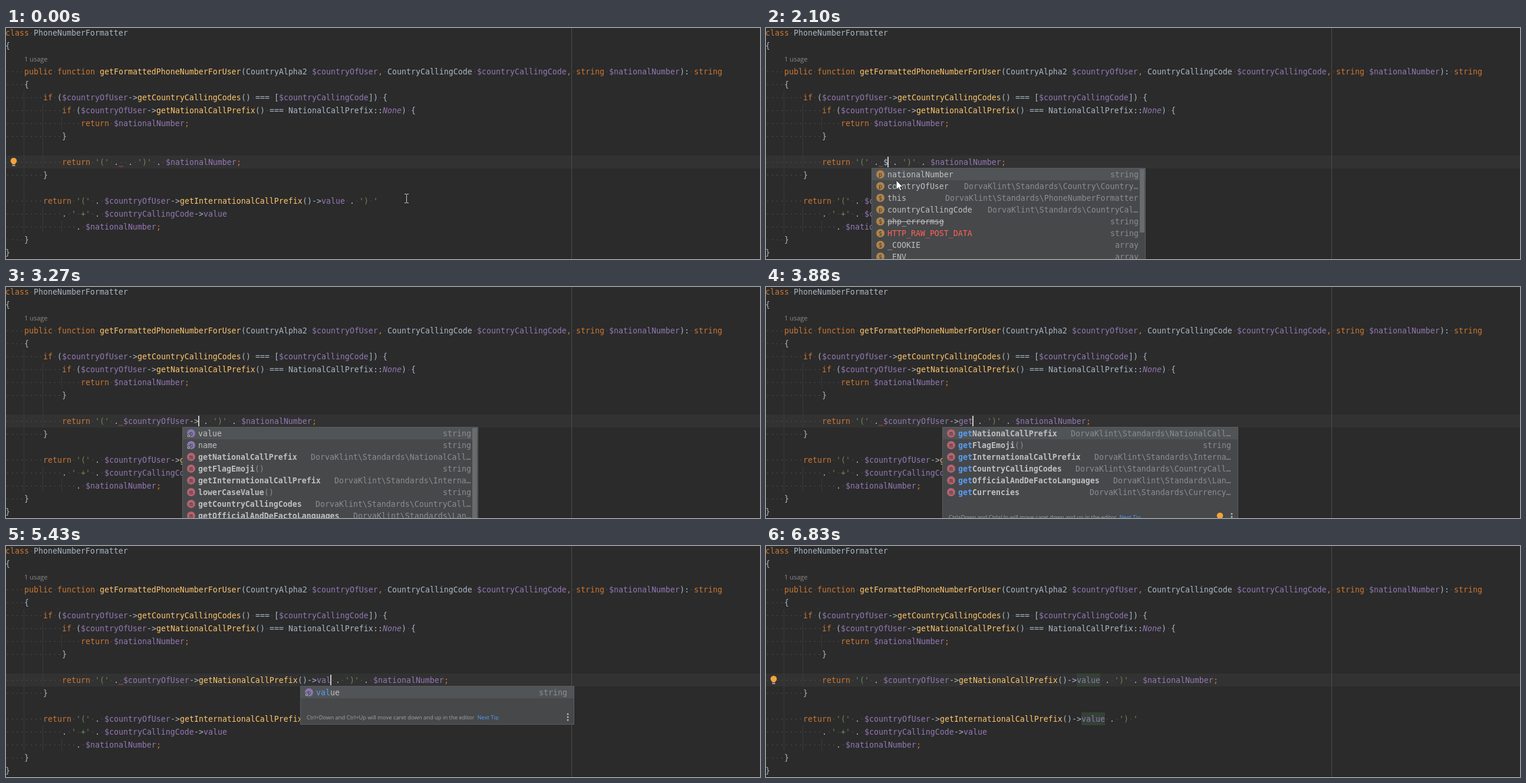
Animation, 1279 px wide and 393 px high, one loop 7150 ms. Source, as an HTML page with a canvas:

```html
<!DOCTYPE html>
<html lang="en">
<head>
<meta charset="utf-8">
<title>Code completion</title>
<style>
html, body { margin: 0; width: 100%; height: 100%; overflow: hidden; background: #2b2b2b; }
canvas { display: block; }
</style>
</head>
<body>
<canvas id="stage" width="1279" height="393"></canvas>
<script>
const ctx = document.getElementById('stage').getContext('2d');
const LOOP = 7150, CELL = 8, EDIT_ROW = 10, EDIT_COL = 25;
const MONO = '13.288px "DejaVu Sans Mono", monospace';
const SANS = '"Open Sans", "Noto Sans", sans-serif';
const TEXT = '#a9b7c6', KEYWORD = '#cc7832', METHOD = '#ffc66d', STRING = '#6a8759';
const VARIABLE = '#9378b4', BLUE = '#589df6', DIM = '#8b8e91', USAGE = '#344134';

const NS = 'DorvaKlint\\Standards\\';
const lines = [
  'class PhoneNumberFormatter',
  '{',
  '',
  '    public function getFormattedPhoneNumberForUser(CountryAlpha2 $countryOfUser, CountryCallingCode $countryCallingCode, string $nationalNumber): string',
  '    {',
  '        if ($countryOfUser->getCountryCallingCodes() === [$countryCallingCode]) {',
  '            if ($countryOfUser->getNationalCallPrefix() === NationalCallPrefix::None) {',
  '                return $nationalNumber;',
  '            }',
  '',
  '',
  '        }',
  '',
  "        return '(' . $countryOfUser->getInternationalCallPrefix()->value . ') '",
  "            . ' +' . $countryCallingCode->value",
  '               . $nationalNumber;',
  '    }',
  '}'
];

// Completion entries: icon, name, type, optional style
const variables = [
  ['p', 'nationalNumber', 'string'],
  ['p', 'countryOfUser', NS + 'Country\\Country…'],
  ['$', 'this', NS + 'PhoneNumberFormatter'],
  ['p', 'countryCallingCode', NS + 'CountryCal…'],
  ['$', 'php_errormsg', 'string', 'strike'],
  ['$', 'HTTP_RAW_POST_DATA', 'string', 'red'],
  ['$', '_COOKIE', 'array'],
  ['$', '_ENV', 'array']
];
const countries = [
  ['p', 'countryOfUser', NS + 'Country\\CountryAlpha2'],
  ['p', 'countryCallingCode', NS + 'CountryCallingC…']
];
const properties = [['f', 'value', 'string'], ['f', 'name', 'string']];
const methods = [
  ['m', 'getNationalCallPrefix', NS + 'NationalCall…'],
  ['m', 'getFlagEmoji()', 'string'],
  ['m', 'getInternationalCallPrefix', NS + 'Interna…'],
  ['m', 'lowerCaseValue()', 'string'],
  ['m', 'getCountryCallingCodes', NS + 'CountryCall…'],
  ['m', 'getOfficialAndDeFactoLanguages', NS + 'Lan…']
];
const getters = [...methods.filter(m => m[1].startsWith('get')), ['m', 'getCurrencies', NS + 'Currency…']];
const GLOBAL_TIP = 'Press Ctrl+Space again to see global variants';
const CARET_TIP = 'Ctrl+Down and Ctrl+Up will move caret down and up in the editor';

const typing = [
  [0, ''], [2040, '$'], [2180, 'c'], [2260, 'o'], [2330, 'u'], [2410, 'n'], [2490, 't'],
  [2880, 'ryOfUser'], [3030, '-'], [3190, '>'], [3510, 'g'], [3740, 'e'], [3810, 't'],
  [4110, 'N'], [4660, 'ationalCallPrefix()'], [4820, '-'], [5040, '>'],
  [5200, 'v'], [5280, 'a'], [5430, 'l'], [5510, 'u'], [5580, 'e']
];
const pointer = [
  [0, 679, 290], [70, 668, 284], [150, 600, 262], [230, 500, 236], [310, 400, 220],
  [390, 310, 214], [470, 245, 216], [550, 212, 222], [630, 199, 228], [700, 194, 230],
  [930, 197, 230], [1020, 200, 230], [1110, 201, 230], [1320, 212, 245], [1400, 222, 259],
  [6290, 300, 270], [6370, 430, 285], [6450, 590, 305], [6530, 760, 325],
  [6610, 930, 348], [6690, 1080, 368], [6760, 1193, 386]
];

const colX = col => col * CELL - 1;
const rowY = row => 8 + row * 22;
const within = (t, from, to) => t >= from && t < to;

function rect(x, y, w, h, color) {
  ctx.fillStyle = color;
  ctx.fillRect(x, y, w, h);
}

function write(text, x, y, color, font = MONO) {
  ctx.font = font;
  ctx.fillStyle = color;
  ctx.fillText(text, x, y);
}

function disc(x, y, r, color) {
  ctx.fillStyle = color;
  ctx.beginPath();
  ctx.arc(x, y, r, 0, 7);
  ctx.fill();
}

const TOKEN = /('[^']*')|(\$\w+)|\b(class|public|function|if|return|string)\b|(\w+(?=\())|((?<=->)\w+)|((?<=::)\w+)|([,;])|\w+|[^\s\w'$,;]+|./g;
const TOKEN_COLORS = [STRING, VARIABLE, KEYWORD, METHOD, VARIABLE, VARIABLE, KEYWORD];

function codeLine(text, row) {
  const y = rowY(row);
  for (const match of text.matchAll(TOKEN)) {
    const x = colX(match.index), group = match.slice(1).findIndex(Boolean);
    write(match[0], x, y + 5, TOKEN_COLORS[group] || TEXT, (group === 5 ? 'italic ' : '') + MONO);
  }
  [...text].forEach((ch, i) => {
    if (ch === ' ') rect(colX(i) + 3, y, 2, 1, '#4d4f50');
  });
}

function highlight(row, col, length) {
  rect(colX(col), rowY(row) - 11, length * CELL, 22, USAGE);
}

function bulb(x, y) {
  disc(x, y - 2, 5.3, '#f2a43a');
  rect(x - 2.5, y + 2, 5, 2, '#f2a43a');
  rect(x - 2.5, y + 5, 5, 2, '#a3a5a7');
}

function icon(kind, x, y) {
  disc(x, y, 7, { m: '#b5626f', f: '#8878ae' }[kind] || '#b1834a');
  ctx.textAlign = 'center';
  write(kind === 'f' ? 'p' : kind, x, y + 3.5, '#35383a', '10px "DejaVu Sans Mono", monospace');
  ctx.textAlign = 'left';
  if (kind === 'f') {
    disc(x - 4, y + 4, 3.5, '#46484a');
    disc(x - 4, y + 4, 2.5, '#a2a7ad');
    disc(x - 4, y + 4, 1, '#46484a');
  }
}

function popup(left, right, items, { match = '', tip, showBulb, bar }) {
  const top = 238, bottom = tip ? top + 21 + items.length * 20 + 25 - 20 + 20 : 400;
  rect(left, top, right - left, bottom - top, '#5a5d5f');
  rect(left + 1, top + 1, right - left - 2, bottom - top - 2, '#46484a');
  rect(left + 1, top + 1, right - left - 2, 20, '#515457');
  items.forEach(([kind, name, type, style], i) => {
    const y = 249 + i * 20, x = left + 27, base = y + 5;
    const font = (kind === 'm' ? 'bold ' : '') + MONO;
    const label = name.replace('()', '');
    icon(kind, left + 15, y);
    write(match, x, base, BLUE, font);
    write(label.slice(match.length), x + match.length * CELL, base, style === 'red' ? '#ff6257' : '#c0c0c0', font);
    if (label !== name) write('()', x + label.length * CELL, base, DIM);
    if (style === 'strike') rect(x, y, label.length * CELL, 1, '#c0c0c0');
    write(type, right - 12 - type.length * CELL, base, DIM);
  });
  if (bar) rect(right - 10, 240, 8, bar, '#696b6d');
  if (tip) {
    const y = bottom - 13, font = '9.4px ' + SANS;
    write(tip, left + 11, y + 4, '#a0a2a4', font);
    write('Next Tip', left + 16 + ctx.measureText(tip).width, y + 4, BLUE, font);
    for (const dy of [-5, 0, 5]) disc(right - 11, y + dy, 1.5, '#b8babc');
    if (showBulb) bulb(right - 31, y);
  }
}

function completion(t) {
  if (within(t, 2100, 2180)) popup(179, 644, variables, { bar: 108 });
  if (within(t, 2180, 2880)) {
    const match = 'count'.slice(0, typedAt(t).length - 1);
    popup(179, 681, countries, { match, tip: GLOBAL_TIP, showBulb: t >= 2730 });
  }
  if (within(t, 3270, 3510)) popup(299, 801, [...properties, ...methods], { bar: 153 });
  if (within(t, 3510, 4660)) {
    const match = typedAt(t).split('->')[1];
    const items = t < 4110 ? getters : getters.slice(0, 1);
    popup(299, 801, items, { match, tip: CARET_TIP, showBulb: within(t, 3880, 4110) });
  }
  if (within(t, 5040, 5580)) {
    const match = typedAt(t).split('->')[2];
    popup(499, 964, t < 5200 ? properties : properties.slice(0, 1), { match, tip: CARET_TIP });
  }
}

function typedAt(t) {
  return typing.filter(key => key[0] <= t).map(key => key[1]).join('');
}

function guides() {
  for (const [x, from, to] of [[30, 107, 349], [62, 129, 239], [62, 305, 349], [94, 151, 173], [94, 327, 349]]) {
    rect(x, from, 1, to - from, '#393a3b');
  }
}

function usages(t) {
  if (within(t, 2490, 2880)) highlight(EDIT_ROW, EDIT_COL, 6);
  if (within(t, 2880, 3030)) {
    for (const [row, col] of [[3, 65], [5, 12], [6, 16], [EDIT_ROW, EDIT_COL], [13, 21]]) highlight(row, col, 14);
  }
  if (t >= 5580) {
    highlight(EDIT_ROW, 66, 5);
    highlight(13, 67, 5);
  }
}

function squiggle() {
  ctx.strokeStyle = '#c9504a';
  ctx.lineWidth = 1;
  ctx.beginPath();
  for (let i = 0; i <= 4; i++) ctx.lineTo(191 + i * 2, i % 2 ? 234.5 : 236.5);
  ctx.stroke();
}

function mouse(t) {
  if (within(t, 2880, 6210) || t >= 6830) return;
  const [, x, y] = pointer.filter(key => key[0] <= t).pop();
  if (within(t, 2100, 2880)) {
    ctx.beginPath();
    for (const [dx, dy] of [[0, 0], [0, 16], [4, 12.5], [6.5, 18], [9, 17], [6.5, 11.5], [11, 11.5]]) {
      ctx.lineTo(x - 1 + dx, y + dy);
    }
    ctx.closePath();
    ctx.fillStyle = '#fff';
    ctx.fill();
    ctx.strokeStyle = '#222';
    ctx.lineWidth = 1;
    ctx.stroke();
    return;
  }
  rect(x, y - 7, 1, 14, '#d0d0d0');
  for (const dy of [-8, 7]) {
    rect(x - 3, y + dy, 3, 1, '#d0d0d0');
    rect(x + 1, y + dy, 3, 1, '#d0d0d0');
  }
}

function draw(t) {
  const typed = typedAt(t), caretX = colX(EDIT_COL + typed.length);
  rect(0, 0, 1279, 393, '#2b2b2b');
  rect(0, 217, 1279, 22, '#323232');
  rect(0, 392, 1279, 1, '#212121');
  guides();
  rect(959, 0, 1, 393, '#4f4f4f');
  usages(t);
  lines.forEach(codeLine);
  codeLine(`            return '(' . ${typed} . ')' . $nationalNumber;`, EDIT_ROW);
  write('1 usage', 31, 57, '#8a8a8a', '11px ' + SANS);
  if (within(t, 4660, 4820)) {
    rect(caretX - 16, 217, 16, 22, '#3b514d');
    write('()', caretX - 16, 233, '#ffef28');
  }
  if (t < 5880) squiggle();
  if (t < 1320 || t >= 6450) bulb(13, 228);
  if (within(t, 490, 1020) || within(t, 1320, 1780) || within(t, 2040, 5880) || within(t, 6370, 6830)) {
    rect(caretX - 1, 219, 2, 18, '#c8c8c8');
  }
  completion(t);
  mouse(t);
}

function tick() {
  draw(performance.now() % LOOP);
  requestAnimationFrame(tick);
}
tick();
</script>
</body>
</html>
```
